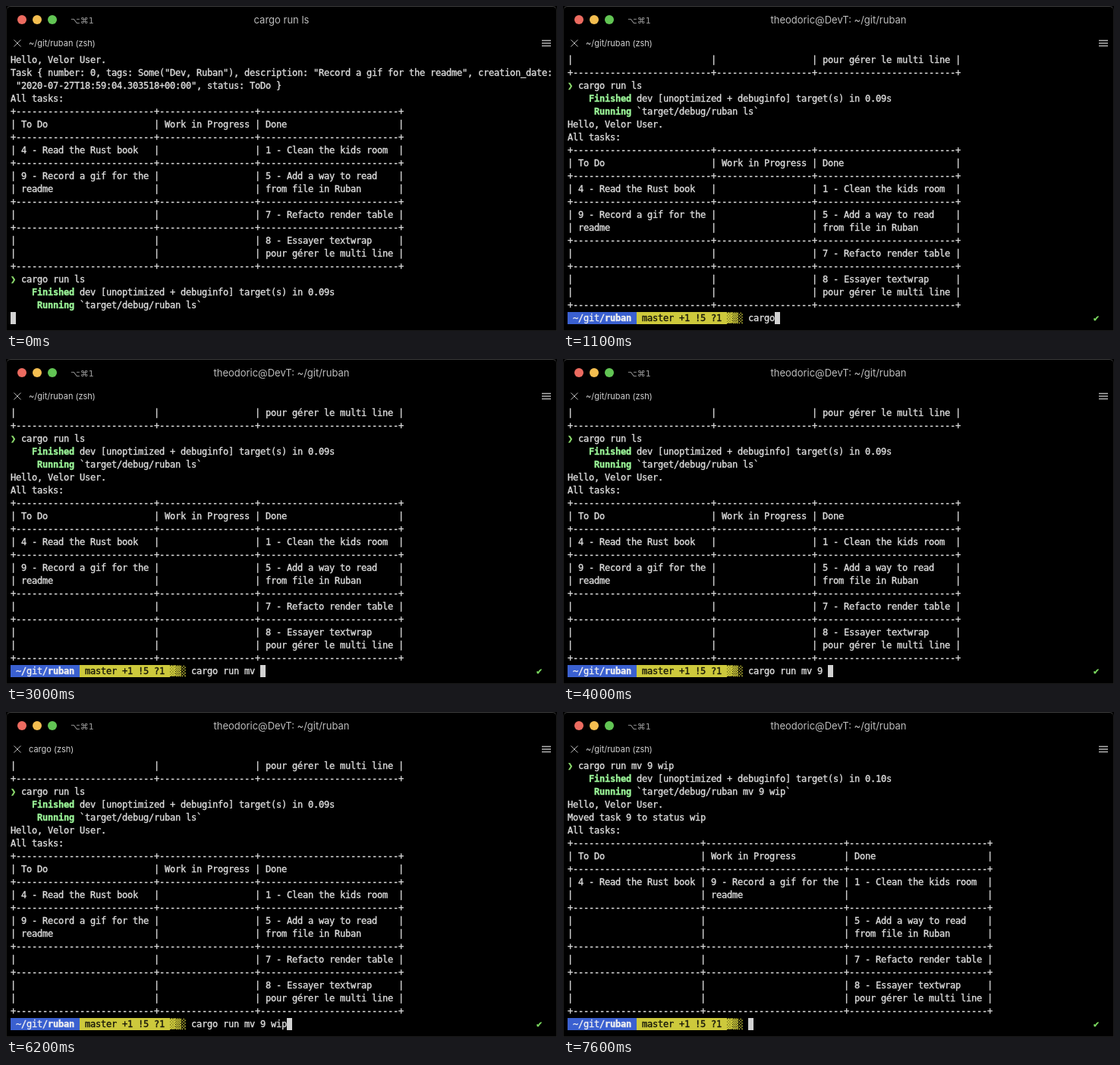
Recreate the animation shown at these times as an HTML page. Size 726 by 428 pixels, loop 7700 ms.

```html
<!DOCTYPE html>
<html lang="en">
<head>
<meta charset="utf-8">
<title>Terminal</title>
<style>
html, body { margin: 0; width: 100%; height: 100%; overflow: hidden; background: #000; }
#stage { position: relative; width: 726px; height: 428px; overflow: hidden; background: #000; }
.bar { position: absolute; left: 0; width: 726px; font-family: Inter, sans-serif; }
#head { top: 0; height: 38px; }
#tabs { top: 38px; height: 23px; }
.dot { position: absolute; top: 12px; width: 12px; height: 12px; border-radius: 50%; }
#keys { position: absolute; left: 85px; top: 11px; font: 11px/17px "DejaVu Sans", sans-serif; color: #9c9c9c; }
#title { position: absolute; left: 0; right: 0; top: 10px; font-size: 13px; line-height: 17px; text-align: center; color: #bdbdbd; }
#tab { position: absolute; left: 30px; top: 3px; font-size: 11px; line-height: 16px; color: #d0d0d0; }
#tabs svg { position: absolute; left: 0; top: 0; }
#frame { position: absolute; inset: 0; border: 1px solid #1c1c1c; border-top-color: #3c3c3c; border-radius: 6px 6px 0 0; }
#term {
  position: absolute; left: 6px; top: 63px; margin: 0; color: #dcdcdc;
  font: 12px/17px "DejaVu Sans Mono", monospace;
  letter-spacing: calc(7px - 1ch);
  -webkit-text-stroke: 0.35px;
}
#term div { height: 17px; white-space: pre; position: relative; }
#term span { display: inline-block; height: 16px; vertical-align: top; }
#term .ok { color: #9bf598; font-weight: bold; }
#term .arrow { color: #8fe070; width: 7px; font-weight: bold; }
#term .dir { background: #3a60d0; color: #f0f0f0; }
#term .git { background: #cdc93c; color: #16160a; }
#term .shade { color: #cdc93c; width: 21px; overflow: hidden; }
#term .check { position: absolute; left: 693px; top: 0; color: #7ddc62; }
#term .cursor { width: 7px; background: #d2d2d2; }
</style>
</head>
<body>
<div id="stage">
  <div id="head" class="bar">
    <div class="dot" style="left:15px;background:#ec6b60"></div>
    <div class="dot" style="left:35px;background:#f4be50"></div>
    <div class="dot" style="left:55px;background:#62c554"></div>
    <div id="title"></div>
    <div id="keys">⌥⌘1</div>
  </div>
  <div id="tabs" class="bar">
    <svg width="726" height="23" fill="none" stroke="#b4b4b4">
      <path d="M10.5 6.5l9 9m0-9l-9 9"/>
      <path d="M706 7.5h12m-12 3.5h12m-12 3.5h12" stroke-width="1.6"/>
    </svg>
    <div id="tab"></div>
  </div>
  <pre id="term"></pre>
  <div id="frame"></div>
</div>
<script>
const LOOP = 7700, ROWS = 21;
const $ = id => document.getElementById(id);
const span = (cls, text = "") => `<span class="${cls}">${text}</span>`;

// Each group is a list of text lines; a rule separates the groups.
function table(widths, groups) {
  const rule = "+" + widths.map(w => "-".repeat(w + 2) + "+").join("");
  const line = cells => "|" + widths.map((w, i) => ` ${(cells[i] || "").padEnd(w)} |`).join("");
  return [rule, ...groups.flatMap(g => [...g.map(line), rule])];
}

const header = [["To Do", "Work in Progress", "Done"]];
const read = "4 - Read the Rust book", record = "9 - Record a gif for the";
const clean = "1 - Clean the kids room";
const addA = ["", "", "5 - Add a way to read"], addB = ["", "", "from file in Ruban"];
const tail = [
  [["", "", "7 - Refacto render table"]],
  [["", "", "8 - Essayer textwrap"], ["", "", "pour gérer le multi line"]]
];
const before = table([24, 16, 24], [
  header, [[read, "", clean]],
  [[record, ...addA.slice(1)], ["readme", ...addB.slice(1)]], ...tail
]);
const after = table([22, 24, 24], [
  header, [[read, record, clean], ["", "readme"]], [addA, addB], ...tail
]);

const run = (args, secs) => [
  `${span("arrow", "❯")} cargo run ${args}`,
  `    ${span("ok", "Finished")} dev [unoptimized + debuginfo] target(s) in ${secs}s`,
  `     ${span("ok", "Running")} \`target/debug/ruban ${args}\``
];
const hello = "Hello, Velor User.", all = "All tasks:", cursor = span("cursor");
const prompt = text => span("dir", " ~/git/<b>ruban</b> ") + span("git", " master +1 !5 ?1 ") +
  span("shade", "▓▒░") + " " + text + cursor + span("check", "✔");

const listing = [
  hello,
  'Task { number: 0, tags: Some("Dev, Ruban"), description: "Record a gif for the readme", creation_date:',
  ' "2020-07-27T18:59:04.303518+00:00", status: ToDo }',
  all, ...before, ...run("ls", "0.09")
];
const listed = [...listing, hello, all, ...before];
const moving = [...listed, ...run("mv 9 wip", "0.10")];
const moved = [...moving, hello, "Moved task 9 to status wip", all, ...after];

const command = "cargo run mv 9 wip";
const keyTimes = [600, 700, 800, 900, 1100, 1200, 1300, 1400, 1500, 1600, 1700, 1900,
  2200, 3400, 3700, 5300, 5500, 5700];
const home = "theodoric@DevT: ~/git/ruban", folder = "~/git/ruban (zsh)";

function state(t) {
  if (t < 100) return ["cargo run ls", folder, listing, cursor];
  if (t < 6300) {
    const typed = command.slice(0, keyTimes.filter(k => k <= t).length);
    return [home, t < 6200 ? folder : "cargo (zsh)", listed, prompt(typed)];
  }
  if (t < 6400) return ["cargo run mv 9 wip", folder, moving, cursor];
  return [home, folder, moved, prompt("")];
}

let shown = -1;
const start = performance.now();
function draw() {
  const t = Math.floor(((performance.now() - start) % LOOP) / 100) * 100;
  if (t !== shown) {
    shown = t;
    const [title, tab, lines, last] = state(t);
    $("title").textContent = title;
    $("tab").textContent = tab;
    $("term").innerHTML = [...lines, last].slice(-ROWS).map(l => `<div>${l}</div>`).join("");
  }
  requestAnimationFrame(draw);
}
draw();
</script>
</body>
</html>
```
